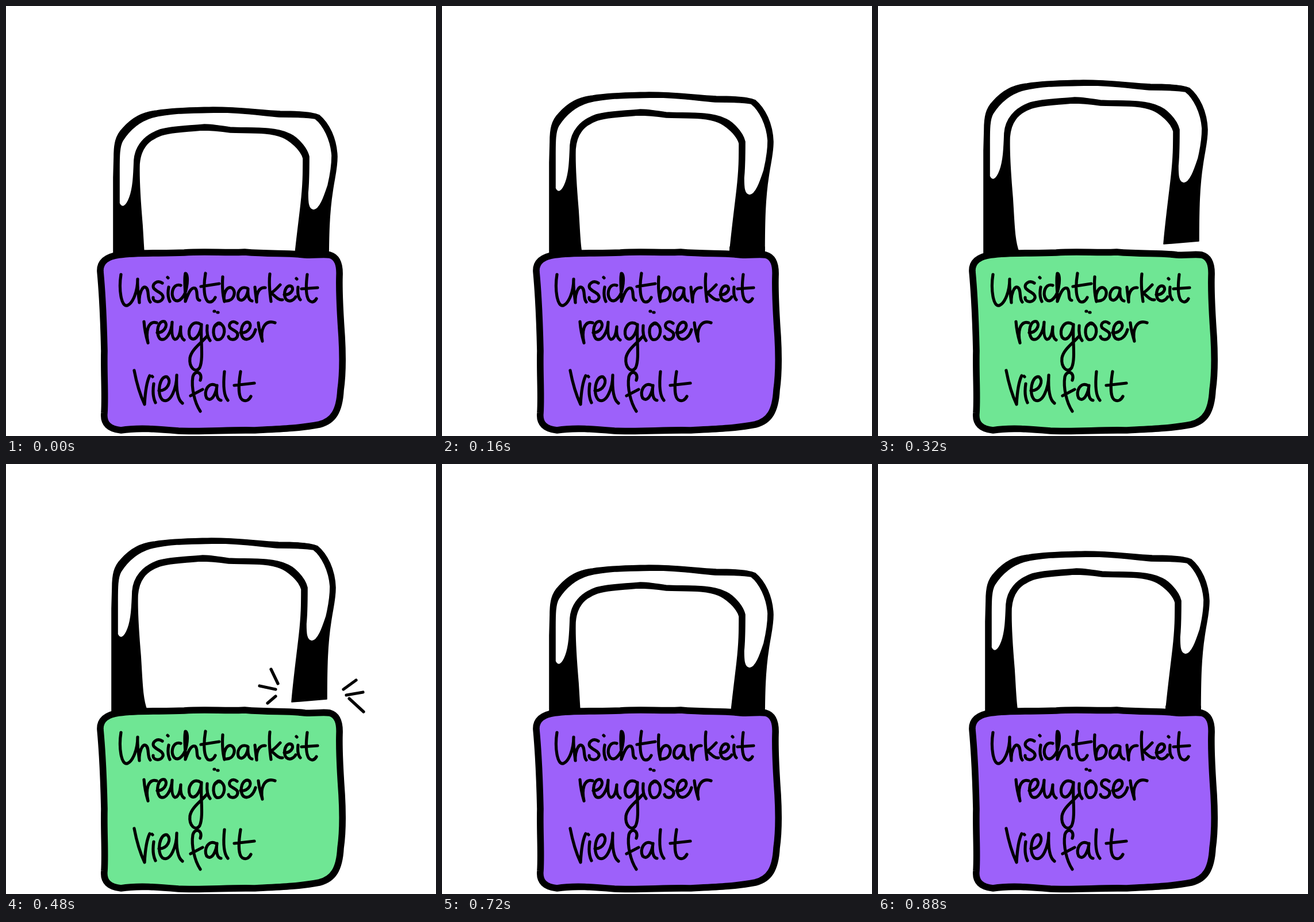
Write an HTML page that moves like this. It is 748x748 px and loops after 960 ms.

```html
<!DOCTYPE html>
<html lang="de">
<head>
<meta charset="utf-8">
<title>Unsichtbarkeit religiöser Vielfalt</title>
<style>
  html, body { margin: 0; width: 100%; height: 100%; overflow: hidden; background: #fff; }
  svg { display: block; width: 100vw; height: 100vh; }
  .pen { fill: none; stroke: #000; stroke-width: 5.2; stroke-linecap: round; stroke-linejoin: round; }
</style>
</head>
<body>
<svg viewBox="0 0 748 748" role="img" aria-label="Unsichtbarkeit religiöser Vielfalt">
  <g id="shackle" stroke="#000" stroke-width="1.6" stroke-linejoin="round">
    <path id="legEnd" d="M501 445H561V490H499Z"/>
    <path d="M187 500V298L188 262C188 240 191 225 203 213C220 194 237 185 262 182C295 177 325 177 360 176
      C410 176 437 181 477 183C505 183 531 184 545 190C562 204 575 231 576 262C576 283 571 300 568 322
      C562 360 561 400 561 456L500 461C503 425 509 380 513 345C517 310 517 290 517 265
      C513 250 493 233 480 228C460 219 425 221 390 220C370 217 355 216 340 216C310 219 288 219 270 225
      C245 234 234 250 232 275C231 305 234 345 237 380C240 425 240 455 248 475V500Z"/>
    <path fill="#fff" d="M197 343V285C197 262 197 244 203 234C216 214 234 200 254 194C290 185 325 186 370 185
      C410 185 440 190 475 193C500 193 523 193 538 196C552 207 565 232 567 260C567 276 564 295 560 312
      C554 330 546 355 535 355C525 354 525 340 525 325C527 305 527 285 527 262
      C523 244 503 225 490 221C465 209 420 213 390 211C370 208 358 206 345 206C315 209 290 209 268 215
      C240 225 225 244 223 268C222 296 221 317 215 333C209 349 202 353 197 343Z"/>
  </g>

  <path id="lock" stroke="#000" stroke-width="11.6" stroke-linejoin="round" d="M164 462C163 446 174 436 196 433
    C235 428 270 431 310 429C350 426 380 430 415 428C460 432 490 429 520 433C540 434 550 431 563 433
    C577 437 581 450 580 470C579 505 582 545 584 575C586 610 586 640 582 668C580 705 569 722 545 728
    C510 735 470 736 430 738C385 737 345 741 300 739C265 736 230 733 200 738C180 736 169 727 171 708
    C173 675 170 640 171 600C170 555 168 505 164 462Z"/>

  <g class="pen">
    <!-- Unsichtbarkeit -->
    <path d="M200 467C196 492 200 524 211 521C221 517 229 496 229 475C228 491 231 506 232 516
      C231 501 237 488 242 489C250 491 245 509 251 515"/>
    <path d="M272 482C263 476 253 484 257 491C263 498 275 500 273 508C269 518 255 515 256 507"/>
    <path d="M283 489C281 499 282 508 285 514M281 472L282 473"/>
    <path d="M304 486C290 481 285 503 293 511C301 518 312 504 314 490C317 475 315 465 312 465
      C309 479 313 500 312 514C317 500 322 488 329 491C335 495 329 511 337 512"/>
    <path d="M347 465C344 483 343 506 351 514C357 517 362 512 364 507M339 488L371 483"/>
    <path d="M377 471C376 486 377 503 380 514C377 500 384 488 392 490C402 495 397 514 382 513"/>
    <path d="M420 491C407 485 400 502 405 510C413 517 421 502 421 492C420 503 422 512 428 513"/>
    <path d="M433 489C434 499 435 507 436 515C435 500 440 489 451 490"/>
    <path d="M459 466C457 482 459 500 461 514M477 485C470 492 466 497 461 499C468 504 473 512 481 511"/>
    <path d="M484 502C494 503 502 494 497 488C487 482 480 503 488 511C494 516 501 511 504 506"/>
    <path d="M508 489C507 499 508 507 512 511M505 474L506 475"/>
    <path d="M524 467C522 483 521 504 527 512C533 518 538 513 540 509M514 492L542 490"/>
    <!-- religiöser -->
    <path d="M240 549C241 562 244 576 247 586C243 568 246 547 262 551"/>
    <path d="M263 568C274 569 283 556 276 549C265 545 259 569 268 579C278 585 288 567 289 550
      C288 563 288 578 294 580C301 579 303 568 304 558C303 570 305 578 310 581"/>
    <path d="M339 554C325 544 314 563 320 576C329 587 339 568 340 554C338 580 344 613 337 629
      C330 640 318 629 320 612C323 597 339 587 350 574"/>
    <path d="M350 556C349 567 350 576 355 582"/>
    <path d="M372 553C359 550 358 574 366 580C378 584 385 562 375 554C371 549 367 552 366 555M362 531H363M368 533H369"/>
    <path d="M402 552C394 545 385 553 390 560C398 566 406 567 402 576C397 583 388 580 387 575"/>
    <path d="M408 568C420 570 429 558 423 551C412 545 404 568 413 578C422 584 431 574 434 563"/>
    <path d="M439 551C440 563 443 573 446 583C442 565 449 544 468 551"/>
    <!-- Vielfalt -->
    <path d="M223 634C227 655 233 676 241 693C242 674 244 655 250 643"/>
    <path d="M257 657C255 670 256 682 260 690M254 644L255 645"/>
    <path d="M266 669C281 670 289 652 280 645C268 642 261 674 272 685C286 694 297 664 297 642C296 663 297 684 307 691"/>
    <path d="M338 651C343 638 329 631 325 645C322 664 328 690 338 705M321 678L342 667"/>
    <path d="M365 660C352 653 343 671 349 682C359 691 366 671 367 660C365 674 367 685 374 686"/>
    <path d="M380 636C378 655 378 677 386 686"/>
    <path d="M408 636C405 654 403 679 411 685C418 689 423 685 426 679M397 660L432 656"/>
  </g>

  <path id="rays" class="pen" d="M461 357L473 382M441 386L469 392M469 404L455 416
    M609 376L587 392M592 402L621 397M597 408L622 431"/>
</svg>
<script>
  const STEP = 80;
  // Lift of the shackle for each step of the loop
  const lifts = [0, 14.5, 26, 37, 47, 47, 47, 47, 47, 0, 12, 24];
  const OPEN_FROM = 4, OPEN_TO = 8;
  const el = id => document.getElementById(id);
  const shackle = el('shackle'), legEnd = el('legEnd'), lock = el('lock'), rays = el('rays');

  function draw(now) {
    const step = Math.floor(now / STEP) % lifts.length;
    const open = step >= OPEN_FROM && step <= OPEN_TO;
    const flash = open && step > OPEN_FROM;
    const scale = step % 2 ? 1.08 : 1;

    shackle.setAttribute('transform', `translate(${open ? -3 : 0} ${-lifts[step]})`);
    legEnd.style.display = open ? 'none' : '';
    lock.setAttribute('fill', open ? '#6fe694' : '#9d61fa');
    rays.style.display = flash ? '' : 'none';
    rays.setAttribute('transform', `translate(532 396) scale(${scale}) translate(-532 -396)`);
  }

  const start = performance.now();
  function tick() {
    draw(performance.now() - start);
    requestAnimationFrame(tick);
  }
  tick();
</script>
</body>
</html>
```
